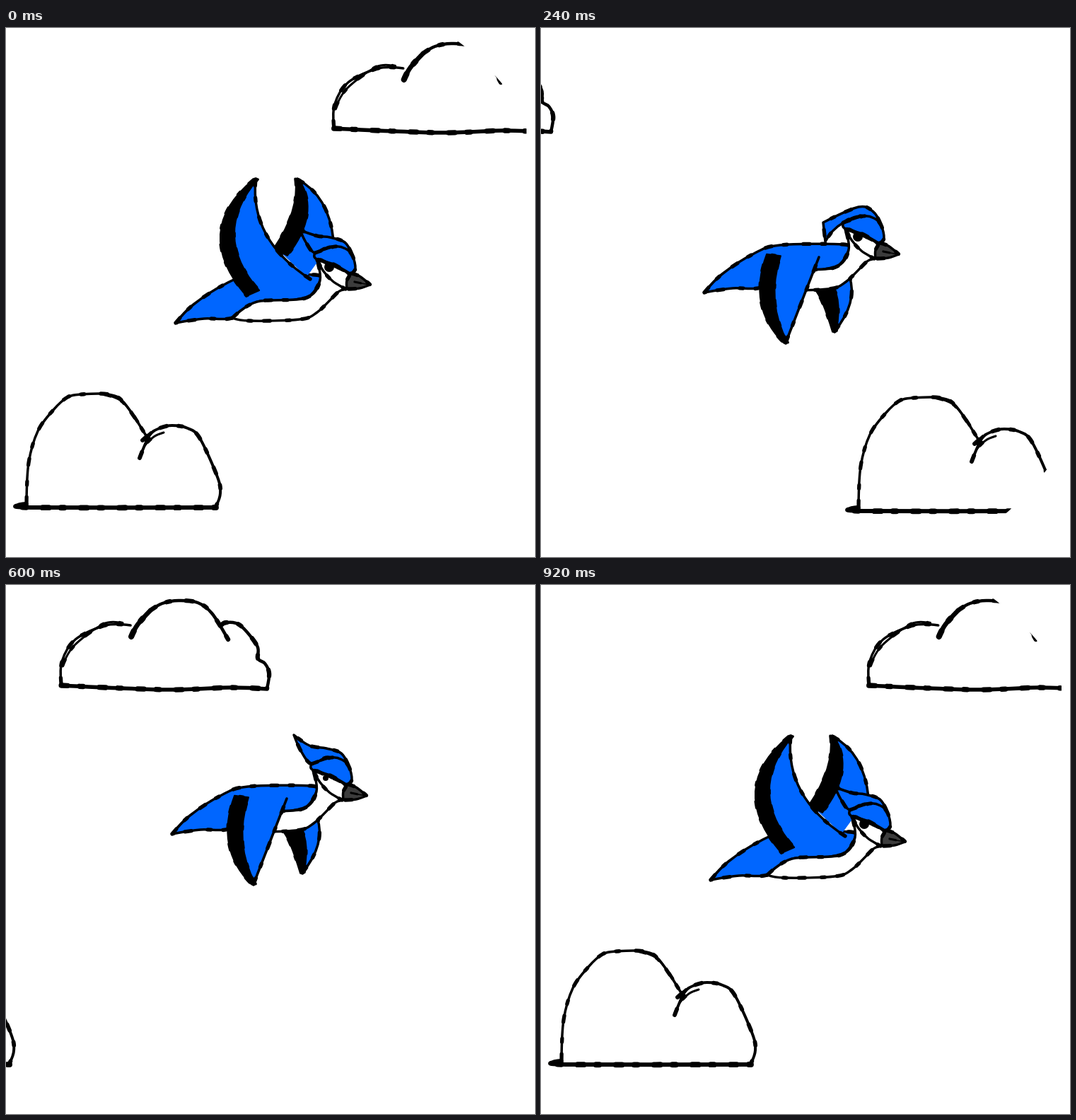
Animation, 748 px wide and 748 px high, one loop 0.96 s. Source, as an HTML page with a canvas:

```html
<!DOCTYPE html>
<html>
<head>
<meta charset="utf-8">
<style>
html, body { margin: 0; width: 100%; height: 100%; overflow: hidden; background: #fff; }
canvas { display: block; }
</style>
</head>
<body>
<canvas id="stage" width="748" height="748"></canvas>
<script>
const ctx = document.getElementById('stage').getContext('2d');
const BLUE = '#0066ff', BLACK = '#000', WHITE = '#fff', GREY = '#3c3c3c';
const STEP = 40, FRAMES = 24;
ctx.lineCap = ctx.lineJoin = 'round';

const mix = (a, b, u) => a + (b - a) * u;
const mixAll = (a, b, u) => a.map((v, i) => mix(v, b[i], u));

// A stroke with a dashed, wider second pass looks like an uneven brush.
function ink(width) {
  ctx.lineWidth = width;
  ctx.stroke();
  ctx.setLineDash([9, 17, 5, 23]);
  ctx.lineWidth = width + 1.8;
  ctx.stroke();
  ctx.setLineDash([]);
}

// Smooth path through flat x,y points; sharp turns stay corners.
function trace(p, closed) {
  const n = p.length / 2;
  const at = i => {
    const k = closed ? (i + n) % n : Math.max(0, Math.min(n - 1, i));
    return [p[2 * k], p[2 * k + 1]];
  };
  const tangent = i => {
    const [a, b, c] = [at(i - 1), at(i), at(i + 1)];
    const u = [b[0] - a[0], b[1] - a[1]], v = [c[0] - b[0], c[1] - b[1]];
    const cos = (u[0] * v[0] + u[1] * v[1]) / (Math.hypot(...u) * Math.hypot(...v) || 1);
    return cos < 0.3 ? [0, 0] : [(u[0] + v[0]) / 6, (u[1] + v[1]) / 6];
  };
  ctx.beginPath();
  ctx.moveTo(p[0], p[1]);
  for (let i = 0; i < (closed ? n : n - 1); i++) {
    const a = at(i), b = at(i + 1), s = tangent(i), e = tangent(i + 1);
    ctx.bezierCurveTo(a[0] + s[0], a[1] + s[1], b[0] - e[0], b[1] - e[1], b[0], b[1]);
  }
}
function shape(points, fill, width = 3.5) {
  trace(points, true);
  ctx.fillStyle = fill;
  ctx.fill();
  ink(width);
}
function line(points, width) {
  trace(points, false);
  ink(width);
}
function at(x, y, draw) {
  ctx.save();
  ctx.translate(x, y);
  draw();
  ctx.restore();
}

// Curve from a to b whose middle lies on m.
function arch(a, m, b) {
  ctx.quadraticCurveTo(2 * m[0] - (a[0] + b[0]) / 2, 2 * m[1] - (a[1] + b[1]) / 2, b[0], b[1]);
}
// Point beside p, at right angles to the direction from a to b.
function beside(p, a, b, distance) {
  const dx = b[0] - a[0], dy = b[1] - a[1], k = distance / Math.hypot(dx, dy);
  return [p[0] - dy * k, p[1] + dx * k];
}

// Wing points: tip, middle of the black band, middle of the free edge, front joint, back joint.
const wingsUp = {
  near: [353,214, 313,292, 368,292, 430,355, 349,375],
  far: [412,214, 415,263, 447,247, 463,300, 388,317]
};
const wingsRaised = {
  near: [267,290, 302,350, 326,340, 426,367, 350,377],
  far: [479,237, 441,296, 481,269, 476,301, 410,356]
};
const wingsSpread = {
  near: [286,465, 289,395, 332,407, 400,361, 346,364],
  far: [504,428, 502,398, 485,393, 460,384, 494,370]
};
const wingsDown = {
  near: [355,488, 330,430, 380,424, 402,367, 338,364],
  far: [424,472, 418,430, 446,432, 445,394, 406,408]
};
const wingsCurled = {
  near: [383,437, 334,412, 368,403, 399,367, 330,364],
  far: [387,437, 397,425, 413,424, 432,403, 398,413]
};

// Each key: frame, wings, shift of the bird, crest tip and crest back, eye size.
const keys = [
  { at: 0, wings: wingsUp, shift: [0, 0], crest: [416,286, 440,294], eye: 7 },
  { at: 2, wings: wingsRaised, shift: [-6, -11], crest: [408,314, 428,304], eye: 3 },
  { at: 4, wings: wingsSpread, shift: [-8, -27], crest: [410,332, 418,310], eye: 5 },
  { at: 6, wings: wingsDown, shift: [-9, -43], crest: [411,345, 408,318], eye: 7 },
  { at: 10, wings: wingsCurled, shift: [1, -86], crest: [394,334, 422,307], eye: 7 },
  { at: 15, wings: wingsDown, shift: [-5, -65], crest: [412,277, 434,292], eye: 4 },
  { at: 18, wings: wingsSpread, shift: [-7, -36], crest: [420,346, 424,309], eye: 2 },
  { at: 21, wings: wingsRaised, shift: [-4, -11], crest: [415,310, 428,304], eye: 4 },
  { at: 23, wings: wingsUp, shift: [0, 0], crest: [416,286, 440,294], eye: 7 }
];

function poseAt(frame) {
  const i = Math.max(1, keys.findIndex(k => k.at >= frame));
  const a = keys[i - 1], b = keys[i], u = (frame - a.at) / (b.at - a.at);
  return {
    near: mixAll(a.wings.near, b.wings.near, u),
    far: mixAll(a.wings.far, b.wings.far, u),
    shift: mixAll(a.shift, b.shift, u),
    crest: mixAll(a.crest, b.crest, u),
    eye: mix(a.eye, b.eye, u)
  };
}

function drawWing(points, base, thickness) {
  const [tip, bend, edge, front, back] = [0, 2, 4, 6, 8].map(i => points.slice(i, i + 2));
  ctx.beginPath();
  ctx.moveTo(...tip);
  arch(tip, edge, front);
  ctx.lineTo(...base);
  ctx.lineTo(...back);
  arch(back, bend, tip);
  ctx.fillStyle = BLUE;
  ctx.fill();

  ctx.beginPath();
  ctx.moveTo(...tip);
  arch(tip, edge, front);
  ink(3.5);

  const side = s => [
    beside(tip, tip, back, 3 * s),
    beside(bend, tip, back, thickness * s),
    beside(back, bend, back, thickness * s)
  ];
  const [tipA, bendA, backA] = side(1), [tipB, bendB, backB] = side(-1);
  ctx.beginPath();
  ctx.moveTo(...tipA);
  arch(tipA, bendA, backA);
  ctx.lineTo(...backB);
  arch(backB, bendB, tipB);
  ctx.closePath();
  ctx.fillStyle = BLACK;
  ctx.fill();
  ink(2);
}

function drawBody() {
  shape([240,417, 265,391, 310,362, 347,350, 437,349, 444,357, 423,382, 355,388, 320,410, 280,411], BLUE);
  shape([320,410, 355,387, 423,382, 444,357, 438,322, 462,335, 484,348, 481,368,
    470,373, 440,402, 415,412, 345,414], WHITE);
}

function drawHead(crest, eye, open) {
  const [tipX, tipY, backX, backY] = crest;
  shape([489,320, 479,303, 458,296, backX, backY, tipX, tipY,
    mix(tipX, 437, 0.4), mix(tipY, 318, 0.55), 437,318, 460,309], BLUE);
  shape([437,318, 465,309, 480,312, 490,322, 494,340, 488,348, 463,334, 438,326], BLUE);
  line([440,328, 449,344, 462,358, 480,369], 3.5);
  line([445,328, 466,338], 3.5);
  ctx.beginPath();
  ctx.arc(457, 338, eye, 0, 7);
  ctx.fillStyle = BLACK;
  ctx.fill();
  if (open) {
    shape([492,347, 505,349, 518,357, 490,362], GREY);
    shape([484,370, 490,364, 506,384, 494,379], GREY);
  } else {
    shape([488,347, 500,351, 515,363, 500,368, 482,369, 482,357], GREY);
    line([493,359, 513,363], 1.5);
  }
}

function drawBird(frame) {
  const pose = poseAt(frame);
  at(...pose.shift, () => {
    const farWing = () => drawWing(pose.far, [425, 352], 11);
    const lifted = pose.far[1] < 347;
    if (!lifted) farWing();
    drawBody();
    if (lifted) farWing();
    drawHead(pose.crest, pose.eye, frame > 8 && frame < 13);
    drawWing(pose.near, [400, 375], 10);
  });
}

function topCloud() {
  line([2,140, 3,108, 22,77, 65,57, 100,57], 3.5);
  line([4,114, 20,86, 62,55, 88,54], 3);
  line([101,73, 110,56, 128,36], 6.5);
  line([128,36, 145,26, 168,22, 195,25, 215,40, 238,77], 4.5);
  line([228,57, 236,53, 255,57, 279,86, 280,104, 290,111, 296,125, 293,146], 4.5);
  line([2,142, 150,148, 240,145, 293,147], 5.5);
}

function bottomCloud() {
  line([2,672, 5,615, 18,570, 40,540, 60,522, 80,518, 118,518, 140,530, 172,578], 3.5);
  line([112,518, 137,528, 160,558], 3);
  line([162,608, 176,576, 190,566, 208,562, 230,566, 247,580, 272,635, 276,658, 270,676], 4);
  line([162,608, 169,591, 182,578, 196,572], 3);
  line([166,583, 178,572], 4);
  line([1,674, 8,678, 270,678], 6);
}

// Both clouds cross the sky twice per loop, once every 12 frames.
function topX(frame) {
  const x = 431 - 118.3 * (frame % 12 || 11);
  return x < -300 ? x + 1332 : x;
}
function bottomX(frame) {
  const c = frame % 12;
  const [exit, entry, pace] = frame < 12 ? [146, 447, 84.2] : [97.3, 555, 105.6];
  return c < 5 ? 27 - exit * c : entry - pace * (c - 6);
}

function drawClouds(frame) {
  ctx.save();
  // The sky is cut off by a round edge on the right only.
  ctx.beginPath();
  ctx.rect(0, 0, 736, 748);
  ctx.clip();
  ctx.beginPath();
  ctx.moveTo(0, -74);
  ctx.arc(371, 360, 434, -Math.PI / 2, Math.PI / 2);
  ctx.lineTo(0, 794);
  ctx.clip();
  const x = bottomX(frame);
  at(topX(frame), 0, topCloud);
  at(x, x > 100 ? 5 : 0, bottomCloud);
  ctx.restore();
}

function render() {
  const frame = Math.floor(performance.now() / STEP) % FRAMES;
  ctx.fillStyle = WHITE;
  ctx.fillRect(0, 0, 748, 748);
  ctx.strokeStyle = BLACK;
  drawClouds(frame);
  drawBird(frame);
  requestAnimationFrame(render);
}
render();
</script>
</body>
</html>
```
